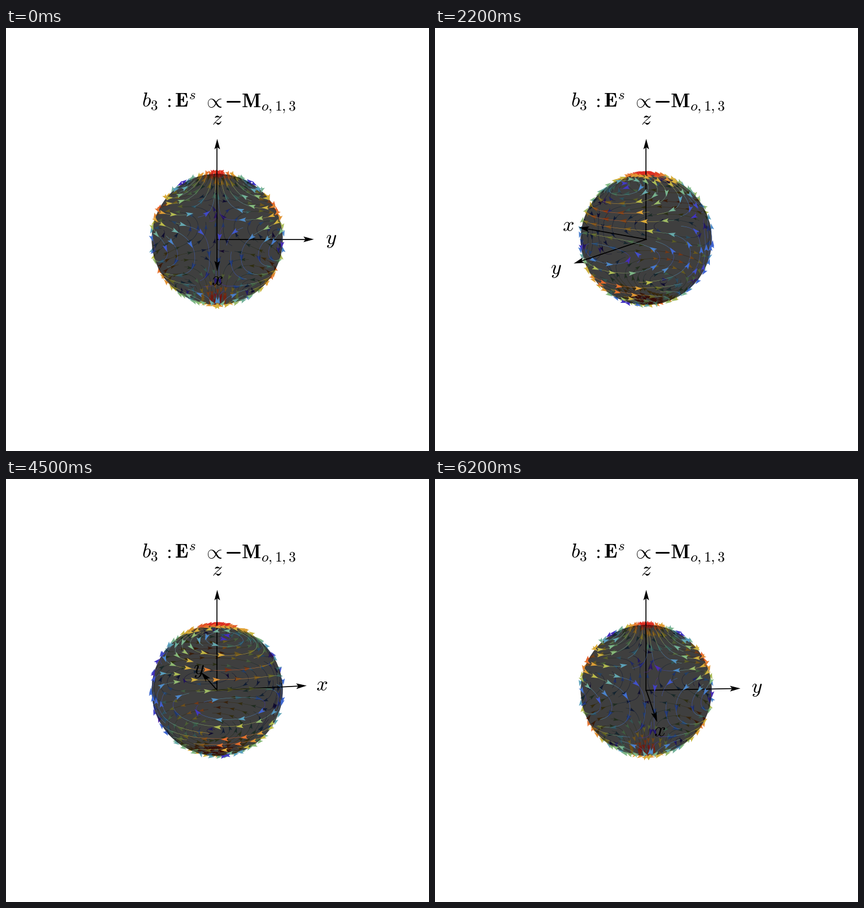
Recreate the animation shown at these times as a matplotlib script. Size 748 by 748 pixels, loop 6.3 s.

```python
import numpy as np
import matplotlib.pyplot as plt
from matplotlib.animation import FuncAnimation
from matplotlib.collections import LineCollection, PolyCollection
from matplotlib.colors import LinearSegmentedColormap
from matplotlib.patches import Circle, Polygon

SIZE, DPI = 748, 100
PT = 72 / DPI                      # points per pixel
FRAMES, INTERVAL = 63, 100
CENTER = np.array([373.5, 373.7])
DIST, FOCAL = 5.45, 621.0          # camera distance and zoom
ELEV = np.arctan(0.25)
AXIS_LEN, LABEL_POS = 1.5, 1.77
SEP, STEP, HEAD_GAP = 0.138, 0.05, 0.28
HEAD = 0.096                       # arrowhead length in sphere radii

plt.rcParams["mathtext.fontset"] = "cm"
RAINBOW = LinearSegmentedColormap.from_list("spectrum", [
    (0.47, 0.11, 0.53), (0.26, 0.18, 0.75), (0.25, 0.43, 0.83),
    (0.35, 0.63, 0.75), (0.51, 0.73, 0.50), (0.74, 0.74, 0.28),
    (0.87, 0.67, 0.22), (0.90, 0.45, 0.18), (0.86, 0.13, 0.13)])


def field(q):
    """Azimuthal and polar parts of the odd (m=1, n=3) vector harmonic."""
    phi, th = q[..., 0], q[..., 1]
    c = np.cos(th)
    return np.stack([np.sin(phi) * c * (15 * c**2 - 11) / 4,
                     -np.cos(phi) * (5 * c**2 - 1) / 4], -1)


def heading(q):
    v = field(q) / np.array([np.sin(q[1]), 1.0])
    return v / max(np.hypot(*v), 1e-9)


def near(q, pts, gap):
    return len(pts) > 0 and ((np.asarray(pts) - q)**2).sum(1).min() < gap**2


def trace(seed, sign, taken):
    path, q = [], seed
    for _ in range(70):
        mid = q + sign * STEP / 2 * heading(q)
        q = q + sign * STEP * heading(mid)
        inside = 0 < q[0] < 2 * np.pi and 0.06 < q[1] < np.pi - 0.06
        if not inside or near(q, taken, 0.7 * SEP) or near(q, path[:-8], 0.7 * SEP):
            break
        path.append(q)
    return path


def streamlines():
    taken, lines = np.empty((0, 2)), []
    for th in np.arange(0.1, np.pi - 0.08, SEP / 2):
        for phi in np.arange(0.05, 2 * np.pi, SEP):
            seed = np.array([phi, th])
            if near(seed, taken, SEP):
                continue
            ahead = trace(seed, 1, taken)
            own = np.array(ahead[8:]).reshape(-1, 2)
            back = trace(seed, -1, np.vstack([taken, own]))
            line = np.array(back[::-1] + [seed] + ahead)
            if len(line) > 3:
                lines.append(line)
                taken = np.vstack([taken, line])
    return lines


def to_sphere(q):
    phi, th = q[..., 0], q[..., 1]
    return np.stack([np.sin(th) * np.cos(phi), np.sin(th) * np.sin(phi),
                     np.cos(th)], -1)


def tangent(q):
    phi, th = q[..., 0], q[..., 1]
    e_phi = np.stack([-np.sin(phi), np.cos(phi), 0 * phi], -1)
    e_th = np.stack([np.cos(th) * np.cos(phi), np.cos(th) * np.sin(phi),
                     -np.sin(th)], -1)
    v = field(q)
    v = v[..., :1] * e_phi + v[..., 1:] * e_th
    return v / np.maximum(np.linalg.norm(v, axis=-1, keepdims=True), 1e-9)


def colors(q):
    return RAINBOW(np.clip(np.linalg.norm(field(q), axis=-1), 0, 1))


def camera(angle):
    ca, sa, ce, se = np.cos(angle), np.sin(angle), np.cos(ELEV), np.sin(ELEV)
    right = np.array([-sa, ca, 0])
    up = np.array([-se * ca, -se * sa, ce])
    toward = np.array([ce * ca, ce * sa, se])
    return right, up, toward


def project(p, cam):
    right, up, toward = cam
    scale = FOCAL / (DIST - p @ toward)
    xy = np.stack([p @ right, -(p @ up)], -1) * scale[..., None]
    return CENTER + xy, scale


def arrowheads(mid, direction, length, width):
    """Notched triangles centred near mid, in pixels."""
    d = direction / np.maximum(np.linalg.norm(direction, axis=-1, keepdims=True), 1e-9)
    n = np.stack([-d[..., 1], d[..., 0]], -1)
    length, width = np.asarray(length)[..., None], np.asarray(width)[..., None]
    tip, tail = mid + 0.5 * length * d, mid - 0.5 * length * d
    return np.stack([tip, tail + width / 2 * n, tail + 0.2 * length * d,
                     tail - width / 2 * n], -2)


lines = streamlines()
gap = round(HEAD_GAP / STEP)
head_q = np.vstack([ln[min(gap // 2, len(ln) - 1)::gap] for ln in lines])
seg_q = np.vstack([np.stack([ln[:-1], ln[1:]], 1) for ln in lines])
head_p, head_v, head_c = 1.015 * to_sphere(head_q), tangent(head_q), colors(head_q)
seg_p, seg_c = to_sphere(seg_q), colors(seg_q.mean(1))

fig = plt.figure(figsize=(SIZE / DPI, SIZE / DPI), dpi=DPI, facecolor="white")
ax = fig.add_axes([0, 0, 1, 1])
ax.set(xlim=(0, SIZE), ylim=(SIZE, 0))
ax.axis("off")

# The sphere is two half-transparent shells: far one, then near one.
radius = FOCAL / np.sqrt(DIST**2 - 1)
for z in (2, 4):
    ax.add_patch(Circle(CENTER, radius, fc=(0, 0, 0, 0.5), ec="none", zorder=z))

# Behind both shells, between them, in front.
head_layers = [PolyCollection([], lw=0, zorder=z) for z in (1.5, 3, 7)]
line_layers = [LineCollection([], lw=w * PT, alpha=a, zorder=z)
               for w, a, z in ((0.6, 0.8, 1), (0.6, 0.75, 6))]
for layer in head_layers + line_layers:
    ax.add_collection(layer)

AXES = np.eye(3)
inner = [ax.plot([], [], "k", lw=1.7 * PT, zorder=5)[0] for _ in AXES]
outer = [ax.plot([], [], "k", lw=1.7 * PT, zorder=8)[0] for _ in AXES]
tips = [ax.add_patch(Polygon(np.zeros((4, 2)), fc="k", ec="none")) for _ in AXES]


def label(x, y, text, **kw):
    return ax.text(x, y, f"${text}$", fontsize=36 * PT, color="k", zorder=9, **kw)


names = [label(0, 0, s, ha="center", va="center") for s in "xyz"]
for x, part in ((240, "b_3"), (277, ":"), (298, r"\mathbf{E}^s"),
                (348, r"\propto"), (416, r"\mathbf{M}_{o,1,3}")):
    label(x, 140, part, ha="left", va="baseline")
ax.plot([391, 413], [129.5, 129.5], "k", lw=3 * PT, solid_capstyle="round", zorder=9)


def draw_axes(cam):
    for k, axis in enumerate(AXES):
        reach = np.array([0, 1, AXIS_LEN, LABEL_POS])[:, None] * axis
        (start, skin, tip, text), _ = project(reach, cam)
        span = tip - start
        size = np.hypot(*span)
        unit = span / max(size, 1e-9)
        length = min(18.5, 0.8 * size)
        neck = tip - 0.7 * length * unit
        if (neck - skin) @ unit < 0:
            skin = neck
        z = 8 if axis @ cam[2] > 0.15 else 5
        inner[k].set_data(*zip(start, skin))
        outer[k].set_data(*zip(skin, neck))
        outer[k].set_zorder(z)
        tips[k].set_xy(arrowheads(tip - length / 2 * unit, unit, length, 10.0))
        tips[k].set_zorder(z)
        names[k].set_position(text)


def update(i):
    cam = camera(0.1 * i)
    eye = DIST * cam[2]

    xy, scale = project(head_p, cam)
    ahead, _ = project(head_p + 0.01 * head_v, cam)
    heads = arrowheads(xy, ahead - xy, HEAD * scale, 0.6 * HEAD * scale)
    view = eye - head_p
    view /= np.linalg.norm(view, axis=1, keepdims=True)
    front = (head_p * view).sum(1) > 0
    facing = (head_v * view).sum(1)
    # A head tilted away from the eye sinks behind its own shell.
    level = np.where(front, np.where(facing > -0.17, 2, 1),
                     np.where(facing > 0.1, 1, 0))
    for n, layer in enumerate(head_layers):
        layer.set_verts(heads[level == n])
        layer.set_facecolor(head_c[level == n])

    seg_xy, _ = project(seg_p, cam)
    mid = seg_p.mean(1)
    near_side = (mid * (eye - mid)).sum(1) > 0
    for side, layer in zip((~near_side, near_side), line_layers):
        layer.set_segments(seg_xy[side])
        layer.set_color(seg_c[side])

    draw_axes(cam)
    return []


anim = FuncAnimation(fig, update, frames=FRAMES, interval=INTERVAL,
                     repeat=True, repeat_delay=0, blit=False)
plt.show()
```
